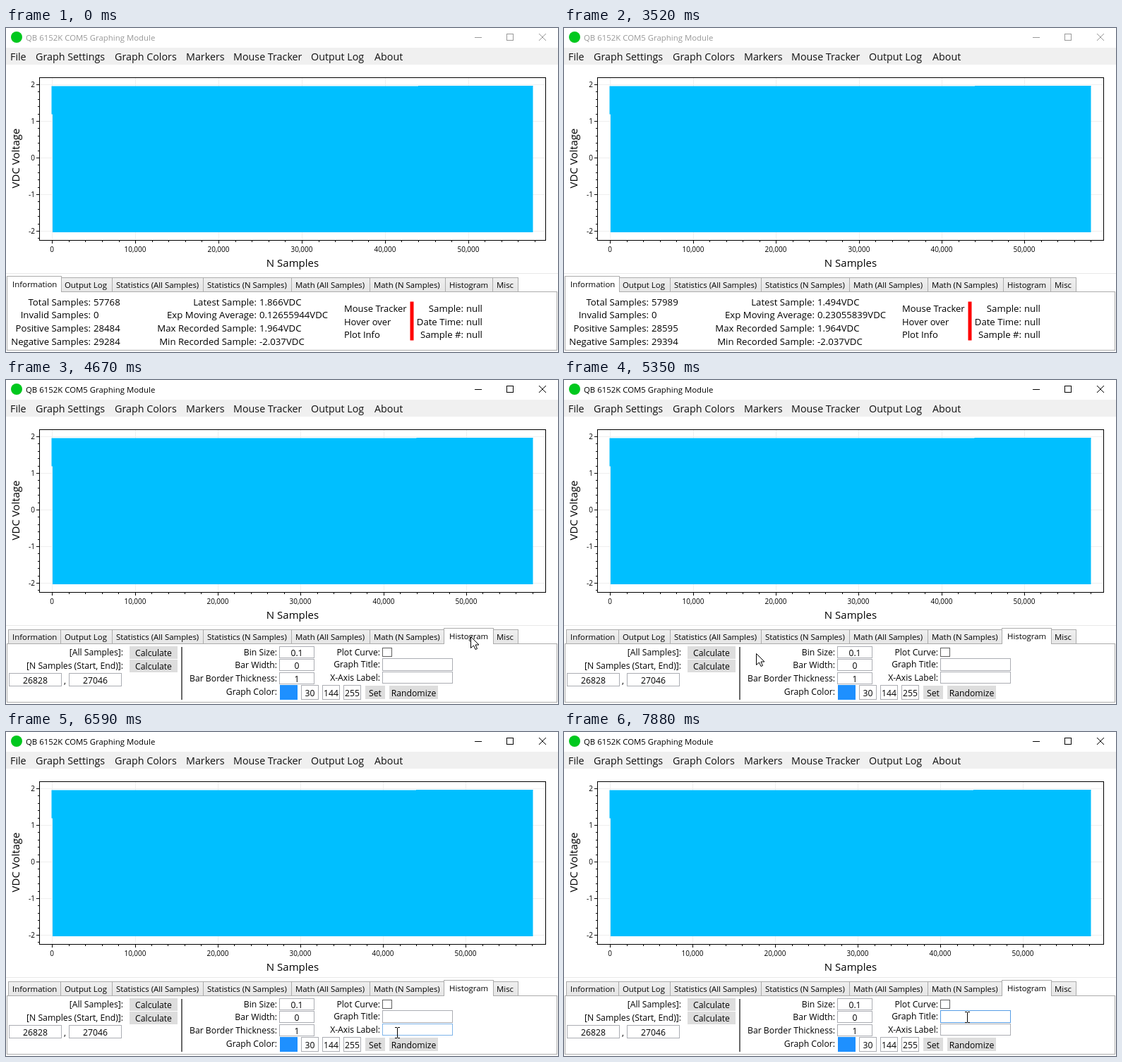
An HTML page with a canvas that plays this animation: 782 by 460 pixels, repeating every 8 s.

```html
<!DOCTYPE html>
<html lang="en">
<head>
<meta charset="utf-8">
<title>Graphing Module</title>
<style>
html, body { margin: 0; width: 100%; height: 100%; overflow: hidden; background: #fff; }
canvas { display: block; }
</style>
</head>
<body>
<canvas id="stage" width="782" height="460"></canvas>
<script>
const ctx = document.getElementById('stage').getContext('2d');
const LOOP = 8000, TAB_SWITCH = 4610, FOCUS = 7350, CARET_BLINK = 530;

// time, total, positive, latest value, moving average
const readings = [
  [0, 57768, 28484, '1.866', '0.12655944'],
  [460, 57822, 28511, '1.812', '0.16243518'],
  [1520, 57878, 28539, '1.748', '0.19410104'],
  [2510, 57933, 28567, '1.629', '0.21306472'],
  [3520, 57989, 28595, '1.494', '0.23055839'],
  [4540, 58045, 28623, '1.346', '0.25818265'],
  [5560, 58101], [6660, 58156], [7680, 58212]
];

// time, x, y of the pointer's hot spot
const pointerPath = [
  [3590, 705, 425], [3660, 672, 392], [3920, 672, 392], [4130, 660, 368],
  [4330, 660, 368], [4540, 658, 364], [5000, 658, 364], [5350, 272, 388],
  [5490, 240, 396], [5770, 362, 378], [6250, 500, 412], [6590, 554, 427],
  [6659, 554, 427], [6660, 554, 436], [6860, 554, 436], [7060, 562, 420],
  [7280, 571, 405]
];

const tabs = [
  ['Information', 3, 77], ['Output Log', 77, 150], ['Statistics (All Samples)', 150, 279],
  ['Statistics (N Samples)', 279, 404], ['Math (All Samples)', 404, 515],
  ['Math (N Samples)', 515, 622], ['Histogram', 622, 689], ['Misc', 689, 725]
];

const arrow = new Path2D('M0 0V16L4 12.5L6.5 18L9 17L6.5 11.5H11.5Z');
let pointer, overField;

function text(str, x, y, size, align = 'left', color = '#000') {
  ctx.font = `${size}px "Open Sans", "Noto Sans", sans-serif`;
  ctx.textAlign = align;
  ctx.fillStyle = color;
  ctx.fillText(str, x, y);
}

function rect(x, y, w, h, color) {
  ctx.fillStyle = color;
  ctx.fillRect(x, y, w, h);
}

function outline(x, y, w, h, color) {
  ctx.lineWidth = 1;
  ctx.strokeStyle = color;
  ctx.strokeRect(x + .5, y + .5, w - 1, h - 1);
}

function hovered(x, y, w, h) {
  return pointer && pointer.x >= x && pointer.x < x + w && pointer.y >= y && pointer.y < y + h;
}

function pointerAt(t) {
  if (t < pointerPath[0][0]) return null;
  const next = pointerPath.findIndex(p => p[0] > t);
  if (next < 0) {
    const [, x, y] = pointerPath.at(-1);
    return { x, y };
  }
  const [t0, x0, y0] = pointerPath[next - 1], [t1, x1, y1] = pointerPath[next];
  const k = (t - t0) / (t1 - t0);
  return { x: Math.round(x0 + (x1 - x0) * k), y: Math.round(y0 + (y1 - y0) * k) };
}

function drawTitleBar(active) {
  const color = active ? '#000' : '#999';
  ctx.fillStyle = '#00c81e';
  ctx.beginPath();
  ctx.arc(15, 13, 8, 0, 7);
  ctx.fill();
  text('QB 6152K COM5 Graphing Module', 28, 18, 11.4, 'left', color);
  rect(664, 13, 10, 1, color);
  outline(709, 8, 10, 10, color);
  ctx.beginPath();
  ctx.moveTo(755, 8); ctx.lineTo(765, 18);
  ctx.moveTo(765, 8); ctx.lineTo(755, 18);
  ctx.stroke();
}

function drawMenu() {
  rect(0, 28, 782, 24, '#f0f0f0');
  [['File', 6], ['Graph Settings', 42], ['Graph Colors', 154], ['Markers', 255],
   ['Mouse Tracker', 322], ['Output Log', 432], ['About', 522]]
    .forEach(([label, x]) => text(label, x, 46, 14.3, 'left', '#111'));
}

function drawPlot(total) {
  const sampleX = n => 65.3 + 681 * n / total;
  const valueY = v => 184 - 52 * v;
  for (let n = 0; n <= 50000; n += 10000) rect(Math.round(sampleX(n)), 70, 1, 231, '#efefef');
  for (let v = -2; v <= 2; v++) rect(48, valueY(v), 717, 1, '#efefef');

  rect(66, 82.5, 680.5, 207.5, '#00bfff');
  rect(64.5, 82.5, 1.5, 40, '#00bfff');
  rect(sampleX(44000), 82, 746.5 - sampleX(44000), 1, '#00bfff');
  outline(47, 70, 718, 232, '#000');

  for (let i = 0; sampleX(i * 2000) < 765; i++) {
    const x = Math.round(sampleX(i * 2000)), major = i % 5 === 0;
    rect(x, 302, 1, major ? 4 : 2, '#000');
    if (major) text((i * 2000).toLocaleString('en-US'), x, 318, 10, 'center');
  }
  for (let i = -11; i <= 10; i++) {
    const y = Math.round(valueY(i / 5)), major = i % 5 === 0;
    const length = major ? 4 : 2;
    rect(47 - length, y, length, 1, '#000');
    if (major) text(String(i / 5), 41, y + 4, 10, 'right');
  }
  text('N Samples', 406, 339, 15, 'center');
  ctx.save();
  ctx.translate(19, 185);
  ctx.rotate(-Math.PI / 2);
  text('VDC Voltage', 0, 0, 15, 'center');
  ctx.restore();
  rect(0, 348, 782, 1, '#e8e8e8');
}

function drawTab([label, left, right], selected) {
  const x = selected ? left - 2 : left, y = selected ? 352 : 354;
  const w = right - left + (selected ? 4 : 1), h = selected ? 23 : 21;
  const hot = !selected && hovered(left, 354, right - left, 20);
  const fill = ctx.createLinearGradient(0, y, 0, y + h);
  fill.addColorStop(0, selected ? '#fff' : hot ? '#ecf4fc' : '#f0f0f0');
  fill.addColorStop(1, selected ? '#fff' : hot ? '#dcecfc' : '#e5e5e5');
  rect(x, y, w, h, fill);
  outline(x, y, w, h, hot ? '#7eb4ea' : '#acacac');
  if (selected) rect(x + 1, 374, w - 2, 1, '#fff');
  text(label, left + 6, selected ? 368 : 369, 11.4);
}

function drawTabs(selected) {
  outline(1, 374, 780, 84, '#acacac');
  tabs.forEach((tab, i) => i !== selected && drawTab(tab, false));
  const hot = tabs.findIndex(([, l, r]) => hovered(l, 354, r - l, 20));
  if (hot >= 0 && hot !== selected) drawTab(tabs[hot], false);
  drawTab(tabs[selected], true);
}

function drawInformation([, total, positive, latest, average]) {
  const row = (label, value, x, y) => {
    text(label + ':', x - 4, y, 13.2, 'right');
    text(value, x, y, 13.2);
  };
  row('Total Samples', total, 124, 394);
  row('Invalid Samples', 0, 124, 412);
  row('Positive Samples', positive, 124, 431);
  row('Negative Samples', total - positive, 124, 450);
  row('Latest Sample', latest + 'VDC', 359, 394);
  row('Exp Moving Average', average + 'VDC', 359, 412);
  row('Max Recorded Sample', '1.964VDC', 359, 431);
  row('Min Recorded Sample', '-2.037VDC', 359, 450);
  const lineY = i => Math.round(403 + i * 18.5);
  ['Mouse Tracker', 'Hover over', 'Plot Info'].forEach((s, i) => text(s, 479, lineY(i), 13));
  rect(572.5, 388.5, 5, 55, '#f00');
  ['Sample', 'Date Time', 'Sample #'].forEach((s, i) => row(s, 'null', 652, lineY(i)));
}

function field(value, x, y, w, h, focused) {
  const hot = hovered(x, y, w, h);
  overField ||= hot;
  outline(x, y, w, h, focused ? '#569de5' : hot ? '#7eb4ea' : '#abadb3');
  text(value, x + w / 2, Math.round(y + h / 2 + 5), 12.2, 'center');
}

function button(label, x, y, w, h) {
  rect(x, y, w, h, hovered(x, y, w, h) ? '#bee6fd' : '#ddd');
  text(label, x + w / 2, Math.round(y + h / 2 + 5), 12.2, 'center');
}

function drawHistogram(t) {
  const label = (str, x, y) => text(str, x, y, 12.2, 'right');
  label('[All Samples]:', 166, 391);
  label('[N Samples (Start, End)]:', 166, 410);
  button('Calculate', 175, 378, 68, 18);
  button('Calculate', 175, 397, 68, 18);
  field('26828', 4, 416, 75, 19);
  text(',', 82, 431, 12.2);
  field('27046', 89, 416, 75, 19);
  rect(248, 379, 2, 75, '#696969');

  [['Bin Size:', '0.1'], ['Bar Width:', '0'], ['Bar Border Thickness:', '1']].forEach(([name, value], i) => {
    const y = Math.floor(378 + i * 18.5);
    label(name, 384, y + 13);
    field(value, 387, y, 50, 17);
  });
  label('Graph Color:', 384, 447);
  rect(388, 433, 25, 21, '#1e90ff');
  [30, 144, 255].forEach((v, i) => field(v, 418 + i * 30, 433, 25, 21));
  button('Set', 509, 434, 28, 19);
  button('Randomize', 543, 434, 69, 19);

  label('Plot Curve:', 530, 391);
  outline(533, 380, 14, 13, '#606060');
  label('Graph Title:', 530, 408);
  label('X-Axis Label:', 530, 427);
  field('', 533, 395, 100, 18, t >= FOCUS);
  field('', 533, 414, 100, 17);
  if (t >= FOCUS && (t - FOCUS) % (2 * CARET_BLINK) < CARET_BLINK) rect(583, 395, 1, 18, '#000');
}

function drawPointer() {
  if (!pointer) return;
  const { x, y } = pointer;
  if (overField) {
    rect(x, y - 7, 1, 14, '#000');
    for (const end of [y - 8, y + 7]) {
      rect(x - 3, end, 3, 1, '#000');
      rect(x + 1, end, 3, 1, '#000');
    }
    return;
  }
  ctx.save();
  ctx.translate(x + .5, y + .5);
  ctx.fillStyle = '#fff';
  ctx.strokeStyle = '#000';
  ctx.lineWidth = 1;
  ctx.fill(arrow);
  ctx.stroke(arrow);
  ctx.restore();
}

function draw(t) {
  const reading = readings.findLast(r => r[0] <= t);
  const histogram = t >= TAB_SWITCH;
  pointer = pointerAt(t);
  overField = false;
  rect(0, 0, 782, 460, '#fff');
  drawTitleBar(histogram);
  drawMenu();
  drawPlot(reading[1]);
  drawTabs(histogram ? 6 : 0);
  if (histogram) drawHistogram(t);
  else drawInformation(reading);
  drawPointer();
}

const start = performance.now();
function tick() {
  draw((performance.now() - start) % LOOP);
  requestAnimationFrame(tick);
}
tick();
</script>
</body>
</html>
```
